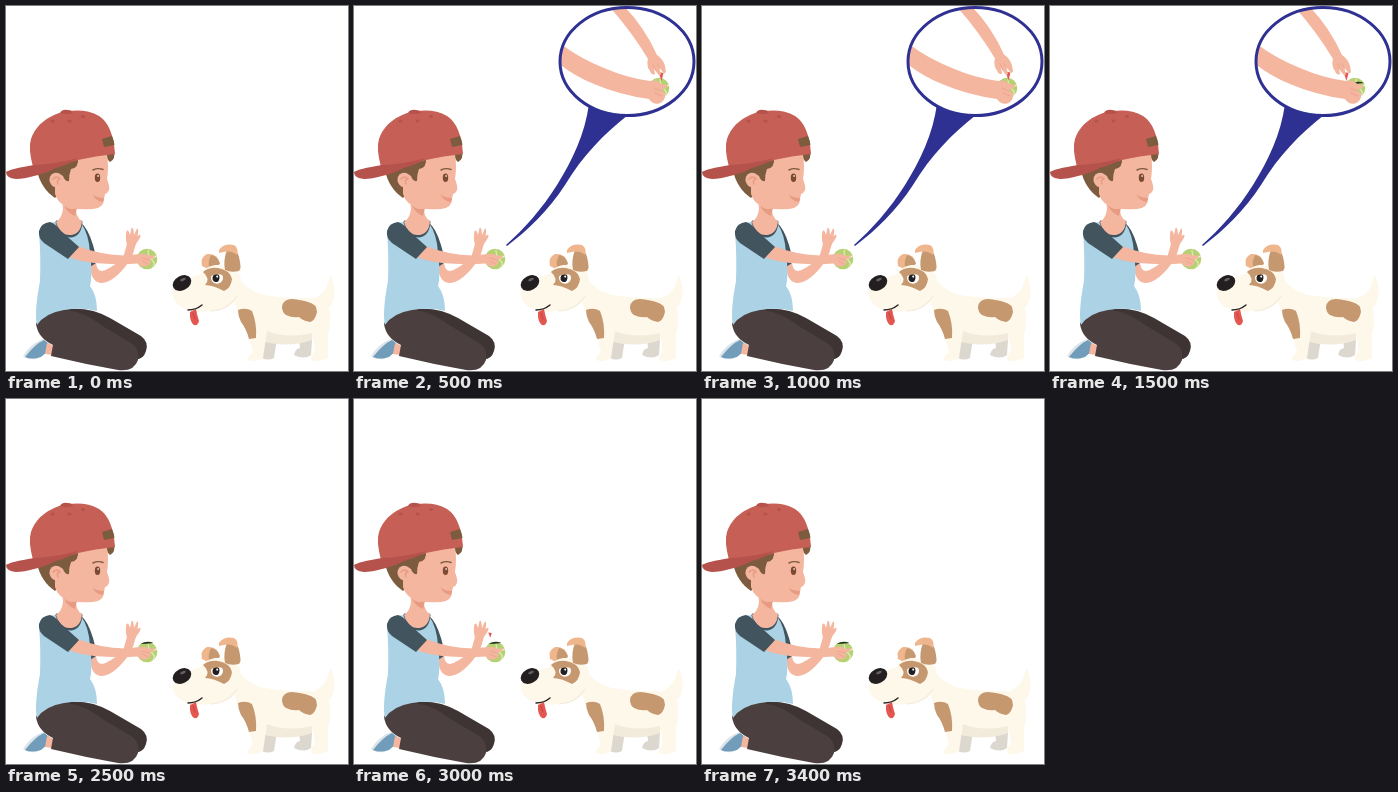
An HTML page with a canvas that plays this animation: 342x365 px, repeating every 5400 ms.

```html
<!DOCTYPE html>
<html lang="en">
<head>
<meta charset="utf-8">
<title>Boy, ball and dog</title>
<style>
html, body { margin: 0; width: 100%; height: 100%; overflow: hidden; background: #fff; }
canvas { display: block; width: 342px; height: 365px; }
</style>
</head>
<body>
<canvas id="stage"></canvas>
<script>
const W = 342, H = 365, LOOP = 5400;
const canvas = document.getElementById('stage');
const ctx = canvas.getContext('2d');
const dpr = window.devicePixelRatio || 1;
canvas.width = Math.round(W * dpr);
canvas.height = Math.round(H * dpr);

const C = {
  skin: '#f4b69f', shade: '#e79b83', hair: '#7d5b3e', cap: '#c65f55', capDark: '#b5524b',
  shirt: '#abd2e5', sleeve: '#42545e', leg: '#4b403f', legDark: '#3d3433', shoe: '#719dba', sole: '#dde5ea',
  ball: '#b6d171', cream: '#fef8eb', creamDark: '#f2ebdc', tan: '#c59870', paw: '#dcd8d0',
  peach: '#efb58d', ink: '#231f20', blue: '#2e3192', red: '#e45750', slit: '#26391f'
};

function fill(d, color) {
  ctx.fillStyle = color;
  ctx.fill(new Path2D(d));
}

function line(d, color, width) {
  ctx.strokeStyle = color;
  ctx.lineWidth = width;
  ctx.lineCap = ctx.lineJoin = 'round';
  ctx.stroke(new Path2D(d));
}

function oval(x, y, rx, ry, color, turn = 0) {
  ctx.beginPath();
  ctx.ellipse(x, y, rx, ry, turn, 0, Math.PI * 2);
  ctx.fillStyle = color;
  ctx.fill();
}

function ball(x, y) {
  oval(x, y, 10.3, 10.3, C.ball);
  line(`M${x - 8} ${y - 4}Q${x} ${y + 3} ${x + 9.5} ${y - 3}`, '#f3f5dc', 1.4);
  line(`M${x + 1} ${y - 9}Q${x + 1} ${y - 3} ${x + 5} ${y + 1}T${x + 6} ${y + 8}`, '#e3ecc1', 1.1);
}

function slit(x, y) {
  fill(`M${x - 6.5} ${y + 1}Q${x} ${y - 3} ${x + 6.5} ${y}Q${x} ${y + 1} ${x - 6.5} ${y + 1}Z`, C.slit);
}

function head() {
  // Hair, neck and face
  fill('M31 165C34 177 40 186 49 192L58 182L73 154L56 156Z', C.hair);
  fill('M56 192L57 203Q56 212 50 216Q54 230 65 229Q75 228 76 215Q69 211 70 200Z', C.skin);
  fill('M58 199Q63 205 71 202L69 210Q61 207 58 199Z', C.shade);
  fill('M49 166L70 152L101 148Q103 160 101 173Q104 181 103 184Q102 187 99 188L98 193Q98 202 87 203Q74 204 65 202Q52 199 49 188Z', C.skin);
  fill('M43 170L54 156L72 152Q73 162 65 163Q63 168 63 175Q59 176 57 170Q50 164 45 170Z', C.hair);
  fill('M97 147L108 144Q110 153 104 156Q101 154 101 149Z', C.hair);
  oval(50, 174, 6.5, 7.3, C.skin, -0.25);
  line('M47 173Q51 169 54 173Q50 174 52 178', C.shade, 1.5);
  oval(91.5, 171.8, 2.7, 4.2, '#7b4a31');
  oval(92.1, 170, 0.7, 0.9, '#fff');
  line('M87 164Q92 161.5 97 163.5', C.hair, 1.4);
  fill('M86.5 188.5Q91 192 98 192L97 196Q90 195.5 86.5 188.5Z', C.shade);

  // Cap
  fill('M27 161Q22 142 25 133Q31 115 53 107Q77 101 93 110Q107 119 109 148Q89 150 72 154Q51 162 27 161Z', C.cap);
  fill('M54 107Q56 103 62 104Q66 104 67 107Q60 109 54 107Z', C.capDark);
  fill('M0 166Q4 163 28 159Q50 158 72 152Q64 158 50 162Q38 168 28 170Q18 173 10 173Q0 172 0 166Z', C.capDark);
  [[46.5, 115], [63.5, 115], [77, 110.5]].forEach(([x, y]) => oval(x, y, 2, 1.5, C.capDark));
  fill('M96 133L106 130Q108 134 108.5 139L98 141Z', C.hair);
}

function boy(open) {
  // Legs and shoe
  fill('M17 350Q24 338 37 333L46 341L30 353Q22 354 17 350Z', C.sole);
  fill('M19 351Q29 338 38 334L47 341L35 351Q26 354 19 351Z', C.shoe);
  fill('M41 337L48 340L46 349L39 348Z', C.skin);
  fill('M50 305Q80 298 104 312L135 330Q143 336 140 345Q137 355 127 353L76 333Z', C.legDark);
  fill('M30 318Q34 306 55 304Q76 304 95 319L125 337Q134 343 132 354Q128 366 112 364Q78 358 45 350L47 339Q32 332 30 318Z', C.leg);

  // Far arm
  fill('M84 260L90 257Q91 265 96 265Q103 264 117 252L121 238L129 240Q127 252 119 261Q106 277 95 277Q85 276 84 260Z', C.skin);
  fill('M121 239Q119 231 120.5 225Q122.5 223 124 229L125.5 222Q127.5 220 128 229L131 222.5Q133 222 131.5 230L134 228.5Q136 230 130.5 237L128 243Z', C.skin);

  // Shirt
  fill('M74 216Q82 222 87 239Q90 249 90 257L84 261L73 230Z', C.sleeve);
  fill('M36 219Q43 216 51 216Q55 230 65 229Q74 228 75 217Q83 228 84 247Q87 269 84 280Q91 289 91 305Q76 301 58 304Q39 307 31 319Q28 307 34 275Q35 252 33 226Z', C.shirt);
  line('M51 216Q55 230 65 230Q74 229 75 216', C.sleeve, 3);
  head();

  // Ball and near arm
  ball(141, 253);
  if (open) slit(141, 244);
  fill('M61 251L72 240Q94 249 119 249.5L134 248Q141 247 144 250L149 249Q150 251 144 254Q146 258 141 260Q135 262 132 257.5Q109 259 88 257Q70 255 61 250Z', C.skin);
  line('M136 252L143 254M136 255L142 258', C.shade, 0.6);
  fill('M33 225Q35 217 44 216Q50 218 55 225L73 241L62 253L38 237Q32 232 33 225Z', C.sleeve);
}

function dog() {
  // Far legs, belly and tail
  fill('M258 331L271 332L268 352Q262 355 256 352Z', C.paw);
  fill('M293 333L306 334L305 349Q298 354 288 349Q289 343 294 342Z', C.paw);
  fill('M258 322L307 320L306 334Q284 342 259 336Z', C.creamDark);
  fill('M305 293Q321 289 324 269Q330 277 328 292Q326 303 313 307Z', C.cream);

  // Body
  fill('M232 270Q238 283 258 289Q281 293 303 292Q322 293 324 307Q325 318 322 329L322 352Q314 357 305 354Q305 348 309 345L306 327Q282 333 261 325L257 352Q250 357 242 354Q242 349 247 346L240 320Q230 309 227 288Z', C.cream);
  fill('M232 304Q240 301 246 305Q251 317 250 332L243 333Q240 322 235 316Q232 310 232 304Z', C.tan);
  fill('M276 301Q277 293 286 293Q296 294 302 296Q311 298 311 306Q309 315 304 316Q297 315 293 311Q286 312 280 309Q276 306 276 301Z', C.tan);

  // Head
  fill('M196 260Q194 251 201 248Q211 247 214 257L204 264Z', C.peach);
  fill('M205 249Q212 250 214 258L204 264Q201 257 205 249Z', C.tan);
  fill('M170 280Q180 272 195 268Q199 261 209 259Q225 258 234 269Q238 282 229 295Q219 306 203 305Q187 307 175 301Q165 294 167 285Z', C.cream);
  fill('M197 266Q203 261 212 262Q224 264 226 273Q225 282 218 285Q207 279 199 279Q205 273 197 266Z', C.tan);
  oval(211, 272, 6, 5.8, '#fff');
  oval(210, 272, 3.4, 4, C.ink, 0.2);
  oval(211.2, 270.6, 1, 1.1, '#fff');
  fill('M202 268Q209 263 219 267L217 269Q210 267 203 271Z', C.tan);
  fill('M219 264Q217 254 221 244Q230 240 233 251Q236 263 233 265Q225 267 219 264Z', C.tan);
  fill('M213 244Q218 237 228 239Q233 242 231 249Q225 243 213 247Z', C.peach);
  oval(176, 277, 9.8, 7.2, C.ink, -0.5);
  oval(177, 273.5, 3, 1.3, '#666062', -0.4);
  fill('M184 306L190 303Q191 309 193 315Q192 320 188 319Q185 317 184 311Z', C.red);
  line('M182 304Q190 304 196 299', C.ink, 1.4);
  line('M187 307L189 313', '#b83f40', 0.8);
  line('M205 305Q222 304 231 290', C.creamDark, 1.2);
}

function lens() {
  ctx.beginPath();
  ctx.ellipse(273, 55.6, 67, 54, 0, 0, Math.PI * 2);
}

// Enlarged view; pose 0, 1 or 2
function callout(pose) {
  fill('M235 98C231 128 218 155 203 179C188 203 169 224 152 239L153 240C174 224 194 205 211 179C229 149 250 128 274 109Z', C.blue);
  ctx.save();
  lens();
  ctx.fillStyle = '#fff';
  ctx.fill();
  ctx.clip();
  ball(305, 82);
  if (pose === 2) slit(307.5, 77);
  fill('M203 35Q224 52 250 62Q273 72 296 75Q304 73 307 78L313 79Q314 82 307 84L311 87Q312 95 305 97.5Q299 99 295 93Q266 89 240 78Q218 69 203 56Z', C.skin);
  line('M300 82L307 85M301 87L308 90', C.shade, 0.7);

  const [dx, dy] = [[0, 0], [-1, -0.5], [-11, 0]][pose];
  ctx.translate(dx - 1, dy);
  fill('M305.5 66L310.5 67L308.5 75Z', C.red);
  fill('M255 -1L269 -2Q291 20 304 49Q310 53 312 60L313 66Q311 69 309 65L306 61L308 68Q307 71 304 67L301 62L302 68Q299 70 297 65Q293 60 295 53Q279 26 255 -1Z', C.skin);
  line('M304 58L307 63M300 58L303 65', C.shade, 0.6);
  ctx.restore();

  lens();
  ctx.strokeStyle = C.blue;
  ctx.lineWidth = 3;
  ctx.stroke();
}

function treat(t) {
  if (t >= 3000 && t < 3200) fill('M134.3 233.5L137.8 234L136.2 238.7Z', C.red);
  if (t >= 3200 && t < 3400) fill('M134.8 239L139.4 240L137 248Z', C.red);
}

function draw(t) {
  ctx.setTransform(canvas.width / W, 0, 0, canvas.height / H, 0, 0);
  ctx.fillStyle = '#fff';
  ctx.fillRect(0, 0, W, H);
  boy(t >= 2500);
  dog();
  if (t >= 500 && t < 2500) callout(t < 1000 ? 0 : t < 1500 ? 1 : 2);
  treat(t);
}

const start = performance.now();
function tick(now) {
  draw(Math.max(0, now - start) % LOOP);
  requestAnimationFrame(tick);
}
draw(0);
requestAnimationFrame(tick);
</script>
</body>
</html>
```
